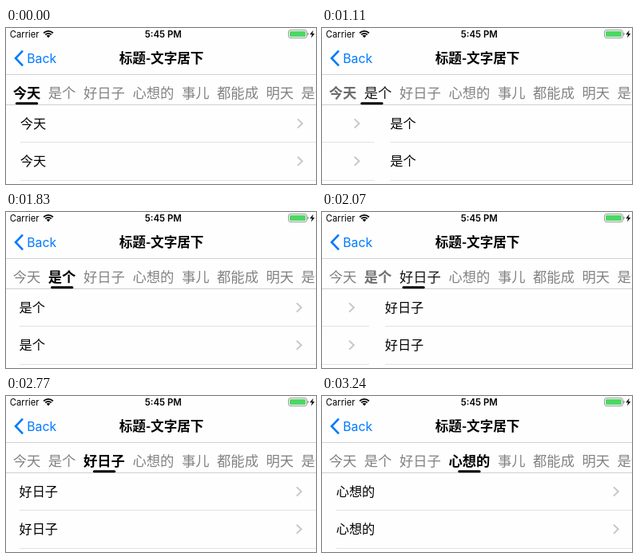
These frames come from a looping animation (388x196 px, 3900 ms). An HTML page with a canvas:

```html
<!DOCTYPE html>
<html lang="zh-CN">
<head>
<meta charset="utf-8">
<title>Tabs</title>
<style>
html, body { margin: 0; width: 100%; height: 100%; overflow: hidden; background: #fefefe; }
canvas { display: block; width: 388px; height: 196px; }
</style>
</head>
<body>
<canvas id="stage"></canvas>
<script>
const W = 388, H = 196, LOOP = 3900;
const PITCH = 392, PAGE = 390; // pages are slightly wider than the view
const EM = 17.6, GAP = 8.8;    // tab character advance and spacing
const CJK = '"Noto Sans CJK SC", "Noto Sans CJK", sans-serif';
const LATIN = 'Inter, sans-serif';
const GRAY = 130;

const canvas = document.getElementById('stage');
const ctx = canvas.getContext('2d');
const dpr = window.devicePixelRatio || 1;
canvas.width = W * dpr;
canvas.height = H * dpr;

let nextX = 8.4;
const tabs = ['今天', '是个', '好日子', '心想的', '事儿', '都能成', '明天', '是个'].map(label => {
  const width = label.length * EM, mid = nextX + width / 2;
  nextX += width + GAP;
  return { label, mid };
});

// Moments at which the picture steps during each swipe
const swipes = [
  [860, 920, 960, 1000, 1050, 1090, 1130, 1180, 1220, 1260, 1310, 1350],
  [1830, 1890, 1950, 2010, 2070, 2130, 2190, 2240, 2290],
  [2770, 2820, 2870, 2920, 2980, 3030, 3080, 3130, 3190, 3240]
];

// Critically damped settle
function settle(ms) {
  const u = (ms + 6) / 74;
  return 1 - (1 + u) * Math.exp(-u);
}

// Scroll position in pages
function positionAt(t) {
  let pos = 0;
  for (const steps of swipes) {
    if (t < steps[0]) break;
    const last = steps[steps.length - 1];
    if (t >= last) { pos++; continue; }
    const held = steps.filter(s => s <= t).pop();
    return pos + settle(held - steps[0]);
  }
  return pos;
}

function text(str, x, y, font, color, align = 'left') {
  ctx.font = font;
  ctx.fillStyle = color;
  ctx.textAlign = align;
  ctx.fillText(str, x, y);
}

function rect(x, y, w, h, color) {
  ctx.fillStyle = color;
  ctx.fillRect(x, y, w, h);
}

function poly(points, color, width) {
  ctx.beginPath();
  points.forEach(([x, y]) => ctx.lineTo(x, y));
  if (width) {
    ctx.lineWidth = width;
    ctx.strokeStyle = color;
    ctx.stroke();
  } else {
    ctx.fillStyle = color;
    ctx.fill();
  }
}

function roundBox(x, y, w, h, r) {
  ctx.beginPath();
  ctx.roundRect(x, y, w, h, r);
}

function wifi() {
  const cx = 53, cy = 12.2, a = -Math.PI * 0.75, b = -Math.PI * 0.25;
  ctx.strokeStyle = ctx.fillStyle = '#000';
  ctx.lineWidth = 1.8;
  for (const r of [8.3, 5.3]) {
    ctx.beginPath();
    ctx.arc(cx, cy, r, a, b);
    ctx.stroke();
  }
  ctx.beginPath();
  ctx.moveTo(cx, cy);
  ctx.arc(cx, cy, 3.3, a, b);
  ctx.fill();
}

function battery() {
  ctx.strokeStyle = '#999';
  ctx.lineWidth = 1;
  roundBox(353.5, 2.5, 23, 10, 2.5);
  ctx.stroke();
  ctx.fillStyle = '#4cd964';
  roundBox(355, 4, 20, 7, 1.2);
  ctx.fill();
  ctx.fillStyle = '#999';
  roundBox(377.3, 5.8, 1.4, 3.6, [0, 1.4, 1.4, 0]);
  ctx.fill();
  poly([[384.6, 2.8], [380.2, 8.2], [383, 8.2], [381.9, 12.6], [386.3, 6.9], [383.5, 6.9]], '#000');
}

function header() {
  text('Carrier', 4.8, 12, '400 11.2px ' + LATIN, '#000');
  wifi();
  text('5:45 PM', 196.8, 12, '600 11.4px ' + LATIN, '#000', 'center');
  battery();
  poly([[21, 28.7], [12, 38], [21, 47.3]], '#007aff', 2.6);
  text('Back', 26.2, 44, '400 15.8px ' + LATIN, '#007aff');
  text('标题-文字居下', 194.6, 44, 'bold 16.6px ' + CJK, '#000', 'center');
  rect(0, 58, W, 1, '#d2d2d2');
}

function tabBar(pos) {
  const from = Math.floor(pos), p = pos - from;
  tabs.forEach(({ label, mid }, i) => {
    const near = Math.max(0, 1 - Math.abs(pos - i));
    const v = Math.round(GRAY * (1 - near));
    const weight = i === from ? 'bold' : '400';
    text(label, mid, 88, `${weight} 17.3px ${CJK}`, `rgb(${v},${v},${v})`, 'center');
  });
  rect(0, 96, W, 1, '#d0d0d0');
  const a = tabs[from].mid, b = tabs[from + 1].mid;
  ctx.fillStyle = '#000';
  roundBox(a + (b - a) * p - 14.2, 93.2, 28.4, 3, 1.5);
  ctx.fill();
}

function page(index, x) {
  for (const mid of [120, 167.3]) {
    text(tabs[index].label, x + 17.7, Math.round(mid + 6), '400 16.2px ' + CJK, '#000');
    poly([[x + 365, mid - 5.6], [x + 370.8, mid], [x + 365, mid + 5.6]], '#c7c7cc', 2);
    rect(x + 18, Math.round(mid + 23.3), PAGE - 18, 1, '#e2e2e4');
  }
}

function draw(t) {
  const pos = positionAt(t), from = Math.floor(pos);
  ctx.setTransform(dpr, 0, 0, dpr, 0, 0);
  rect(0, 0, W, H, '#fefefe');
  header();
  page(from, (from - pos) * PITCH);
  if (pos > from) page(from + 1, (from + 1 - pos) * PITCH);
  tabBar(pos);
}

const start = performance.now();
function tick() {
  draw((performance.now() - start) % LOOP);
  requestAnimationFrame(tick);
}
tick();
</script>
</body>
</html>
```
